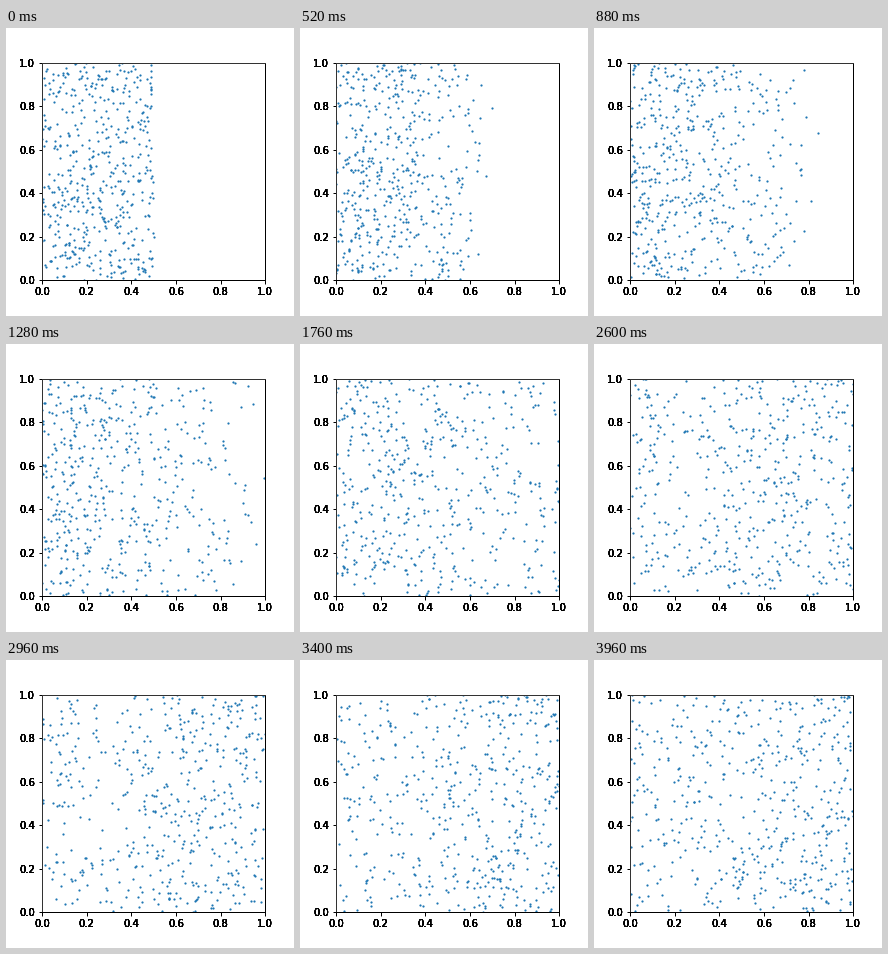
A matplotlib script for the animation above (4 s loop, 288 by 288 pixels).

```python
import numpy as np
import matplotlib.pyplot as plt
from matplotlib.animation import FuncAnimation

COUNT = 500
FRAMES = 100
TOP_SPEED = 0.0163  # box widths per frame
TICKS = np.linspace(0, 1, 6)
LAYERS = 8  # repeated labels turn antialiased edges solid
PAD = 7     # points from axis to label

plt.rcParams.update({
    "font.family": "DejaVu Sans",
    "font.size": 10,
    "axes.linewidth": 1.0,
})

# Gas starts in the left half of the box
rng = np.random.RandomState(0)
start = rng.random_sample((COUNT, 2)) * [0.5, 1.0]
speed = rng.uniform(-TOP_SPEED, TOP_SPEED, (COUNT, 2))


def bounce(pos):
    """Fold free paths back into the unit box, as elastic walls would."""
    return 1 - np.abs(1 - np.mod(pos, 2))


def label(ax):
    x_trans, x_va, x_ha = ax.get_xaxis_text1_transform(PAD)
    y_trans, y_va, y_ha = ax.get_yaxis_text1_transform(PAD)
    for t in TICKS:
        for _ in range(LAYERS):
            ax.text(t, 0, f"{t:.1f}", transform=x_trans, va=x_va, ha=x_ha)
            ax.text(0, t, f"{t:.1f}", transform=y_trans, va=y_va, ha=y_ha)


fig = plt.figure(figsize=(4, 4), dpi=72, facecolor="white")
ax = fig.add_axes([0.125, 0.125, 0.775, 0.755])
ax.set(xlim=(0, 1), ylim=(0, 1), xticks=TICKS, yticks=TICKS)
ax.tick_params(width=1, labelbottom=False, labelleft=False)
ax.spines[["left", "top"]].set_color("#333333")
label(ax)
dots, = ax.plot([], [], "o", ms=1.2, mew=1, color="#1f77b4")


def update(i):
    dots.set_data(*bounce(start + speed * i).T)
    return dots,


def init():
    return update(0)


anim = FuncAnimation(fig, update, frames=FRAMES, init_func=init,
                     interval=40, repeat=True, repeat_delay=0, blit=False)
plt.show()
```
